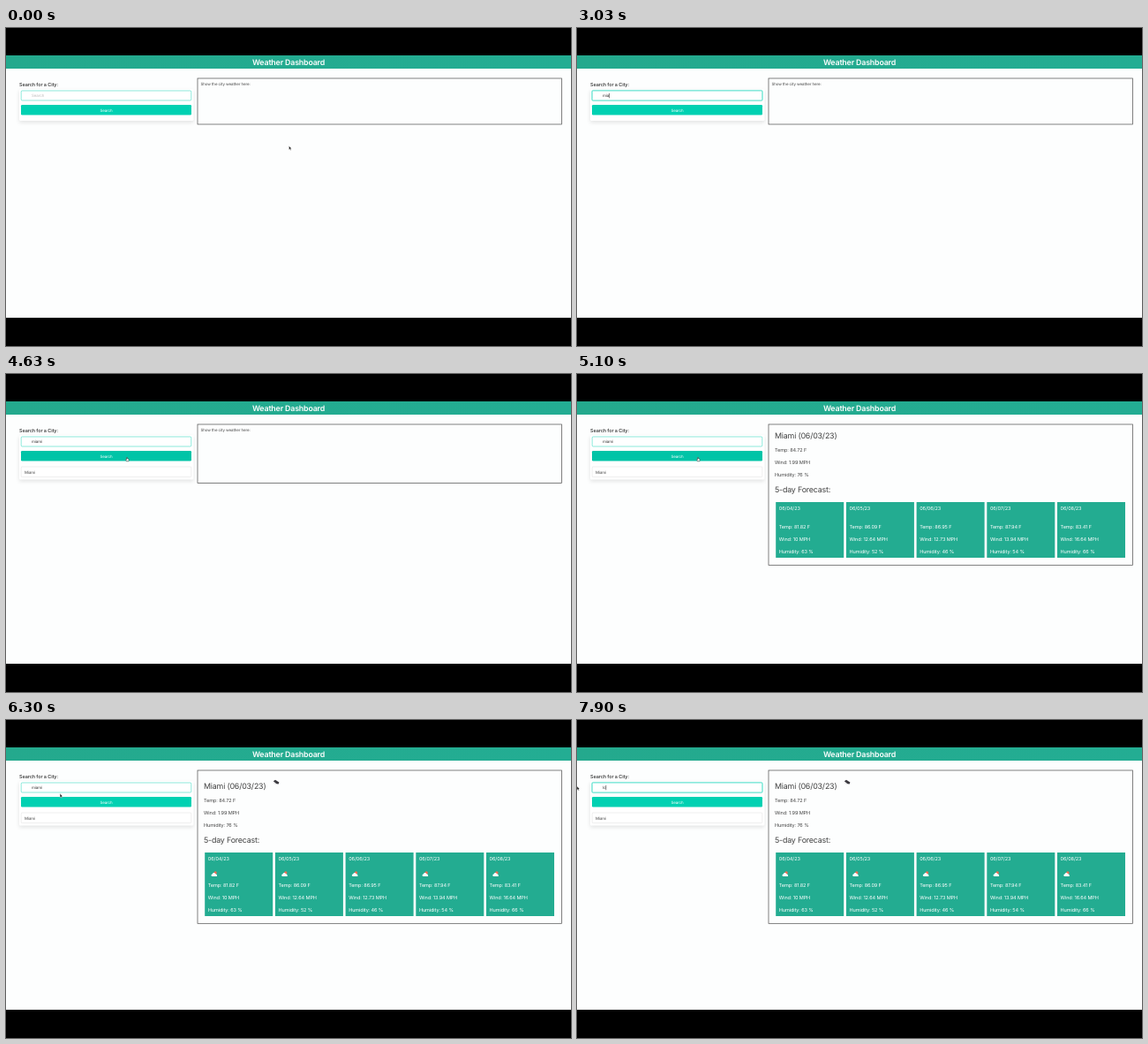
An HTML page that plays this animation: 640 px wide and 360 px high, repeating every 8 s.

```html
<!DOCTYPE html>
<html lang="en">
<head>
<meta charset="utf-8">
<title>Weather Dashboard</title>
<style>
html, body { margin: 0; width: 100%; height: 100%; overflow: hidden; background: #000; }
svg { display: block; width: 640px; height: 360px; }
text {
  font: 5.55px Inter, sans-serif; letter-spacing: -.02em; fill: #464646;
  text-rendering: geometricPrecision; white-space: pre;
}
.title { font-size: 8.85px; font-weight: 600; fill: #fff; text-anchor: middle; }
.head { font-size: 8.85px; fill: #404040; }
.label { font-weight: 500; fill: #303030; }
.small { font-size: 4.45px; }
.card text, .button text { fill: #fff; }
.button text { text-anchor: middle; }
.card rect { fill: #23ac91; }
.box { fill: #fff; filter: drop-shadow(0 2px 2px rgba(10,10,10,.11)); }
</style>
</head>
<body>
<svg viewBox="0 0 640 360">
  <defs>
    <linearGradient id="bar">
      <stop offset="0" stop-color="#24a98d"/><stop offset="1" stop-color="#23ad93"/>
    </linearGradient>
    <g id="rain">
      <circle cx="4.9" cy="1.9" r="1.7" fill="#ec6e55"/>
      <path d="M1.5 6C-.3 6 0 3.6 1.6 3.6C1.9 1.6 4.4 1.6 4.9 3.2C6.6 2.9 7.8 6 6 6Z" fill="#fff"/>
    </g>
    <path id="arrow" d="M0 0V4.3L1 3.4L1.7 4.9L2.4 4.6L1.8 3.1H3Z" fill="#111" stroke="#fff" stroke-width=".4"/>
    <path id="hand" d="M-.5 0Q0-.7.5 0V1.4L2 1.8Q2.4 2 2.2 3L1.8 4.3H-.5L-1.6 2.5L-1.2 2.1L-.5 2.6Z"
      fill="#fff" stroke="#222" stroke-width=".5"/>
    <path id="beam" d="M-.8 0H.8M0 0V4.4M-.8 4.4H.8" fill="none" stroke="#333" stroke-width=".5"/>
  </defs>

  <rect y="31" width="640" height="297" fill="#fdfefe"/>
  <rect y="31" width="640" height="15" fill="url(#bar)"/>
  <text class="title" x="320" y="41.8">Weather Dashboard</text>

  <text class="label" x="15" y="66.3">Search for a City:</text>
  <rect id="box" class="box" x="15" y="69" width="197.5" rx="1.6"/>
  <rect id="halo" x="16.5" y="70.4" width="194" height="12.2" rx="1.6" fill="none" stroke="#00d1b2" stroke-opacity=".25"/>
  <rect id="field" x="17.2" y="71" width="192.6" height="11" rx="1.2" fill="#fff" stroke="#00d1b2" stroke-width=".6"/>
  <rect id="mark" x="29" y="73.4" height="6" fill="#b3d4fd"/>
  <text id="query" class="small" x="29" y="78.3"></text>
  <rect id="caret" y="73.9" width=".6" height="5.4" fill="#333"/>
  <g class="button">
    <rect id="button" x="17" y="87" width="193" height="11.5" rx="1.2"/>
    <text class="small" x="113.5" y="94.6">Search</text>
  </g>
  <g id="saved">
    <rect x="17.2" y="105" width="192.6" height="11.6" rx="1" fill="#fff" stroke="#dcdcdc" stroke-width=".5"/>
    <text class="small" x="21" y="112.6">Miami</text>
  </g>

  <rect id="panel" x="217" y="57" width="412.6" fill="none" stroke="#4a4a4a" stroke-width=".7"/>
  <text id="hint" class="small" x="220.5" y="65.3">Show the city weather here:</text>
  <g id="report"></g>
  <use id="pointer"/>
</svg>
<script>
const $ = id => document.getElementById(id);
const set = (id, attrs) => { for (const k in attrs) $(id).setAttribute(k, attrs[k]); };
const show = (id, on) => { $(id).style.display = on ? '' : 'none'; };
const line = (x, y, s, cls = '') => `<text x="${x}" y="${y}" class="${cls}">${s}</text>`;
const stats = (x, y, [temp, wind, humid]) =>
  line(x, y, `Temp: ${temp} F`) + line(x, y + 14, `Wind: ${wind} MPH`) + line(x, y + 28, `Humidity: ${humid} %`);

const days = [
  ['81.82', '10', 63], ['86.09', '12.64', 52], ['86.95', '12.73', 46],
  ['87.94', '13.94', 54], ['83.41', '16.64', 66]
];

const card = (day, i) => {
  const x = 225.2 + i * 79.7;
  return `<g class="card"><rect class="tile" x="${x}" y="145" width="77" height="63"/>` +
    line(x + 3.6, 154, `06/0${4 + i}/23`) +
    `<use class="icon" href="#rain" x="${x + 7}" y="166"/>` +
    `<g class="stats">${stats(x + 3.6, 175, day)}</g></g>`;
};

$('report').innerHTML =
  line(224, 73.2, 'Miami (06/03/23)', 'head') +
  `<g id="night"><path d="M302.8 64.2L305 62.8L309.4 65.4L308.7 67.4L306.4 67.3Z" fill="#3c3a40"/>
   <path d="M302.8 65.6L305.8 68" stroke="#ddd" stroke-width=".7"/></g>` +
  stats(224, 88, ['84.72', '1.99', 76]) +
  line(224, 134.2, '5-day Forecast:', 'head') +
  days.map(card).join('');

// time, x, y, shape
const path = [
  [0, 320.5, 133.5, 'arrow'], [500, 150, 76, ''], [3830, 150, 78, 'beam'],
  [3930, 145, 85, 'arrow'], [4025, 141, 90.5, 'arrow'], [4150, 137, 94.5, 'hand'],
  [5950, 137, 94.5, 'hand'], [6090, 108, 92, 'hand'], [6220, 74, 86.5, 'arrow'],
  [6290, 61.5, 83.5, 'arrow'], [6425, 44, 75, 'beam'], [6755, 42, 75, 'beam'],
  [6945, 42, 75, 'beam'], [6955, 12, 75, 'arrow'], [7025, 0, 75, 'arrow'], [8001, 0, 75, 'arrow']
];
const typed = [
  [0, ''], [2700, 'm'], [2900, 'mi'], [3030, 'mia'], [3160, 'miam'],
  [3360, 'miami'], [7760, 'l'], [7900, 'lo']
];
const carets = [[960, 1500], [1960, 2500], [2700, 3830], [6560, 6760], [7760, 8000]];

const within = (t, a, b) => t >= a && t < b;
const last = (rows, t) => rows.findLastIndex(r => r[0] <= t);

function movePointer(t) {
  const q = Math.max(0, 26 + Math.floor((t - 26) * .015) / .015);
  const i = last(path, q), [t0, x0, y0] = path[i], [t1, x1, y1] = path[i + 1];
  const k = (q - t0) / (t1 - t0);
  const kind = path[last(path, t)][3];
  const still = t < 500;
  show('pointer', kind);
  set('pointer', {
    href: '#' + kind,
    x: still ? path[0][1] : x0 + (x1 - x0) * k,
    y: still ? path[0][2] : y0 + (y1 - y0) * k
  });
}

function drawField(t) {
  const text = typed[last(typed, t)][1], query = $('query');
  query.textContent = text || 'Search';
  query.style.fill = text ? '#363636' : '#bcbcbc';
  const end = text ? query.getComputedTextLength() : 0;
  const focus = within(t, 500, 4430) || t >= 6560;
  show('halo', focus);
  set('field', { 'stroke-opacity': focus ? 1 : .75 });
  show('caret', carets.some(([a, b]) => within(t, a, b)));
  set('caret', { x: 29 + end });
  show('mark', within(t, 6960, 7760));
  set('mark', { width: t < 7030 ? end * .8 : end });
}

function drawReport(t) {
  const listed = t >= 4630, loaded = t >= 5100, night = t >= 5160, icons = t >= 5230;
  const drop = night ? 5 : 0, grow = icons ? 9 : 0;
  show('saved', listed);
  set('box', { height: listed ? 50.5 : 36 });
  show('hint', !loaded);
  show('report', loaded);
  show('night', night);
  set('report', { transform: `translate(0 ${drop})` });
  set('panel', { height: loaded ? 159.3 + drop + grow : listed ? 66.6 : 52 });
  document.querySelectorAll('.tile').forEach(e => e.setAttribute('height', 63 + grow));
  document.querySelectorAll('.stats').forEach(e => e.setAttribute('transform', `translate(0 ${grow})`));
  document.querySelectorAll('.icon').forEach(e => { e.style.display = icons ? '' : 'none'; });
}

function render(t) {
  drawField(t);
  drawReport(t);
  set('button', { fill: within(t, 4090, 6220) ? '#00c4a7' : '#00d1b2' });
  movePointer(t);
}

const start = performance.now();
function tick() {
  render((performance.now() - start) % 8000);
  requestAnimationFrame(tick);
}
tick();
</script>
</body>
</html>
```
